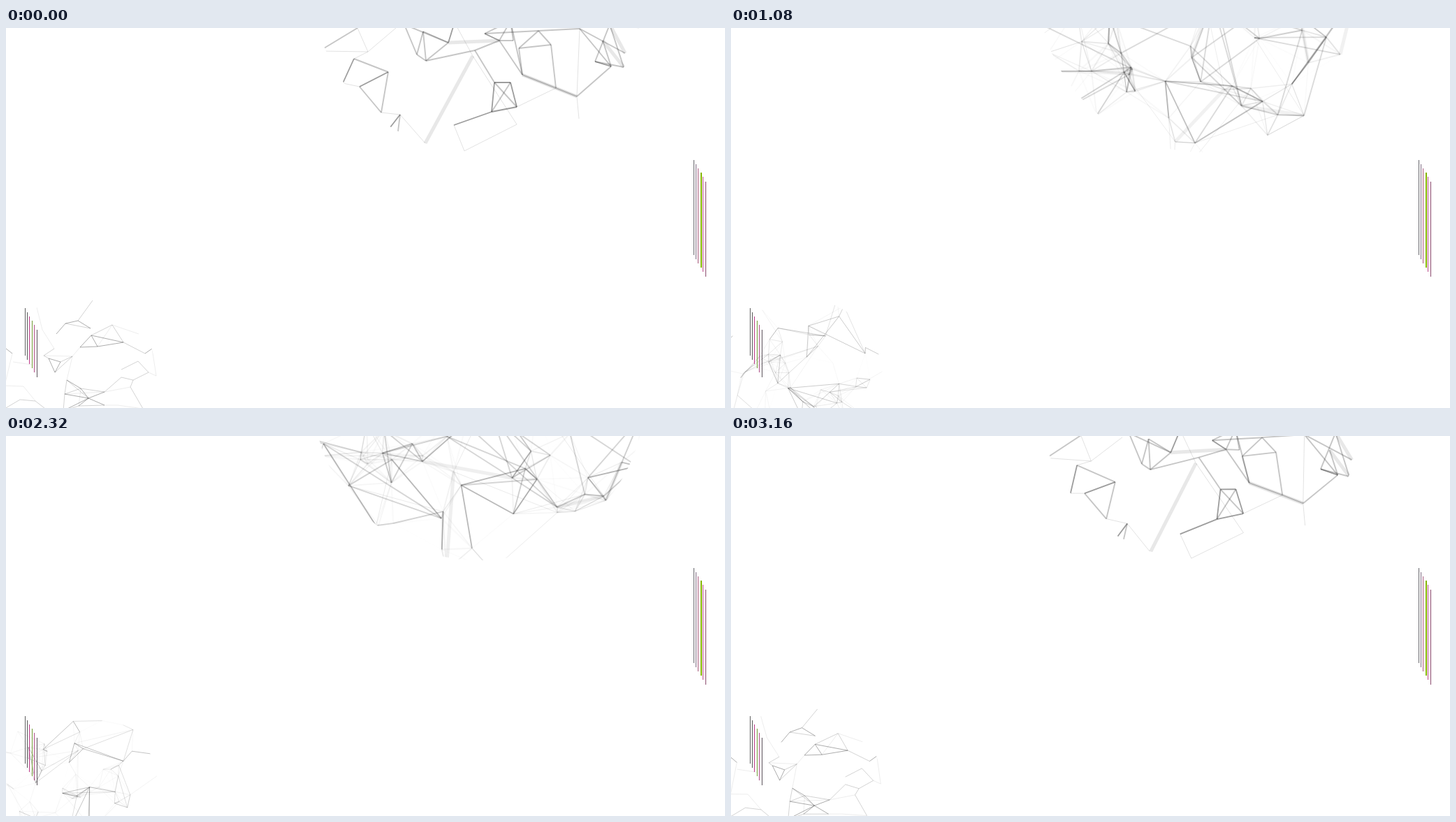
An HTML page with a canvas for the animation above (3200 ms loop, 1029x544 px).

```html
<!DOCTYPE html>
<html lang="en">
<head>
<meta charset="utf-8">
<title>Drifting networks</title>
<style>
  html, body { margin: 0; width: 100%; height: 100%; overflow: hidden; background: #fff; }
  canvas { display: block; }
</style>
</head>
<body>
<canvas id="stage" width="1029" height="544"></canvas>
<script>
const ctx = document.getElementById('stage').getContext('2d');
const LOOP = 3200, STEP = 40, TAU = Math.PI * 2;

function seeded(seed) {
  return () => {
    seed = (seed * 1664525 + 1013904223) >>> 0;
    return seed / 4294967296;
  };
}

// Each chain joins node indices; a style is line width and opacity.
const upper = {
  x: 677, y: -60, r: 238, drift: 42, reach: 84, width: 1.7, ink: .42, seed: 41, extra: 16,
  nodes: [
    [455,29],[503,0],[558,0],[518,34],[498,44],[482,79],[547,63],[506,84],
    [537,121],[550,142],[564,124],[561,148],[600,165],[570,-5],[597,5],[588,38],
    [601,47],[633,21],[642,-8],[671,32],[706,18],[685,8],[726,18],[762,4],
    [722,-10],[739,67],[734,29],[780,24],[787,86],[817,98],[820,130],[821,1],
    [866,55],[843,48],[864,-5],[884,56],[886,36],[699,78],[722,78],[731,113],
    [695,120],[641,139],[656,176],[731,138],[906,0],[450,33],[854,18],[668,40]
  ],
  styles: [
    { width: 5, alpha: .11, chains: [[17,20],[47,12],[25,29],[34,36],[46,35]] },
    { width: 1.8, alpha: .48, chains: [
      [4,5],[6,7],[41,40],[9,10],[40,37,38,39,40],[20,21],[17,18],[33,32]] },
    { width: 1.9, alpha: .28, chains: [
      [4,6,8,7],[0,1],[13,15,16,17,14,15],[14,16],[13,17],[10,11],[16,19,37],
      [20,25,26,23],[25,28,29,32,31],[21,23,31],[24,20,22,24],[21,24,25],
      [34,33,35,34],[31,36],[23,27,28],[26,27],[37,39],[38,40],[19,20],[46,32]] },
    { width: 1, alpha: .14, chains: [
      [2,3,4],[3,45],[5,7],[3,1],[8,10,12],[29,30],[31,29],[41,42,43],[47,43],
      [39,28],[34,44],[18,47]] }
  ]
};

const lower = {
  x: 100, y: 503, r: 117, drift: 20, reach: 41, width: .9, ink: .4, seed: 97, extra: 14,
  nodes: [
    [-5,455],[9,466],[10,478],[37,482],[44,400],[52,432],[54,469],[69,459],
    [61,473],[78,478],[70,493],[95,470],[72,438],[85,423],[103,419],[121,430],
    [124,390],[106,457],[122,440],[131,456],[152,425],[168,450],[199,466],[209,459],
    [87,504],[84,524],[82,548],[107,516],[118,530],[104,541],[141,521],[141,540],
    [165,500],[182,504],[178,514],[196,545],[165,489],[189,477],[204,493],[215,498],
    [-2,545],[20,532],[42,534],[60,548],[25,513],[-2,512],[190,438],[160,540]
  ],
  styles: [
    { width: 1, alpha: .4, chains: [
      [12,13,14,15],[8,9,10,8],[17,18,21],[17,19,21],[18,19],[22,23],[0,1],
      [24,27,28,30],[25,28,26],[28,29],[28,31]] },
    { width: .9, alpha: .24, chains: [
      [20,21,22],[18,20],[24,25,26],[25,27],[13,15],[14,16],[7,6,8],[10,11,9],
      [27,30,32,33,34],[34,35],[36,37,38,33],[40,41,42,43],[24,28],[26,29,31]] },
    { width: .8, alpha: .11, chains: [
      [4,5,7],[2,3],[6,11],[19,20],[45,44,42],[23,39,38],[20,46],[31,47,35],
      [25,30,34],[11,17],[24,11],[1,45],[29,27]] }
  ]
};

function prepare(net) {
  const random = seeded(net.seed);
  const points = net.nodes.slice();
  for (let i = 0; i < net.extra; i++) {
    const angle = random() * TAU, radius = net.r * Math.sqrt(random());
    points.push([net.x + radius * Math.cos(angle), net.y + radius * Math.sin(angle)]);
  }
  net.points = points.map(([x, y]) => ({
    x, y,
    size: net.drift * (.5 + random() * .7),
    px: random() * TAU, py: random() * TAU,
    depth: random()
  }));
}

function line(a, b, width, alpha) {
  ctx.lineWidth = width;
  ctx.strokeStyle = `rgba(50,50,50,${alpha})`;
  ctx.beginPath();
  ctx.moveTo(a.x, a.y);
  ctx.lineTo(b.x, b.y);
  ctx.stroke();
}

function drawNet(net, turn) {
  const open = Math.sin(turn / 2) ** 2;
  const sway = (phase, size) => size * (Math.sin(turn + phase) - Math.sin(phase));
  const pose = net.points.map(p => ({
    x: p.x + sway(p.px, p.size),
    y: p.y + sway(p.py, p.size * .8),
    depth: p.depth
  }));
  ctx.save();
  ctx.beginPath();
  ctx.arc(net.x, net.y, net.r, 0, TAU);
  ctx.clip();
  for (const { width, alpha, chains } of net.styles) {
    for (const chain of chains) {
      for (let i = 1; i < chain.length; i++) {
        line(pose[chain[i - 1]], pose[chain[i]], width, alpha * (1 - .5 * open));
      }
    }
  }
  // Neighbours link up as the nodes leave their opening pose.
  for (let i = 0; i < pose.length; i++) {
    for (let j = 0; j < i; j++) {
      const a = pose[i], b = pose[j];
      const near = 1 - Math.hypot(a.x - b.x, a.y - b.y) / net.reach;
      if (near <= 0) continue;
      const depth = (a.depth + b.depth) / 2;
      line(a, b, net.width * (.5 + depth), net.ink * near * open * (1.2 - depth));
    }
  }
  ctx.restore();
}

const rightBars = ['#66666c', '#7c6a80', '#a8587f', '#86b800', '#bd4d8d', '#8d4d70'];
const leftBars = ['#606060', '#555555', '#c0388a', '#729b35', '#b05088', '#5c555c'];

function drawBars(x, y, height, colors, accent) {
  colors.forEach((color, i) => {
    ctx.fillStyle = color;
    ctx.fillRect(Math.floor(x + i * 3.45), Math.round(y + i * 6.1), i === 3 ? accent : 1, height);
  });
}

function frame(now) {
  const time = Math.floor((now % LOOP) / STEP) * STEP;
  const turn = time / LOOP * TAU;
  ctx.fillStyle = '#fff';
  ctx.fillRect(0, 0, 1029, 544);
  drawNet(upper, turn);
  drawNet(lower, turn);
  drawBars(27, 401, 68, leftBars, 1);
  drawBars(984, 189, 136, rightBars, 2);
  requestAnimationFrame(() => frame(performance.now()));
}

prepare(upper);
prepare(lower);
frame(performance.now());
</script>
</body>
</html>
```
